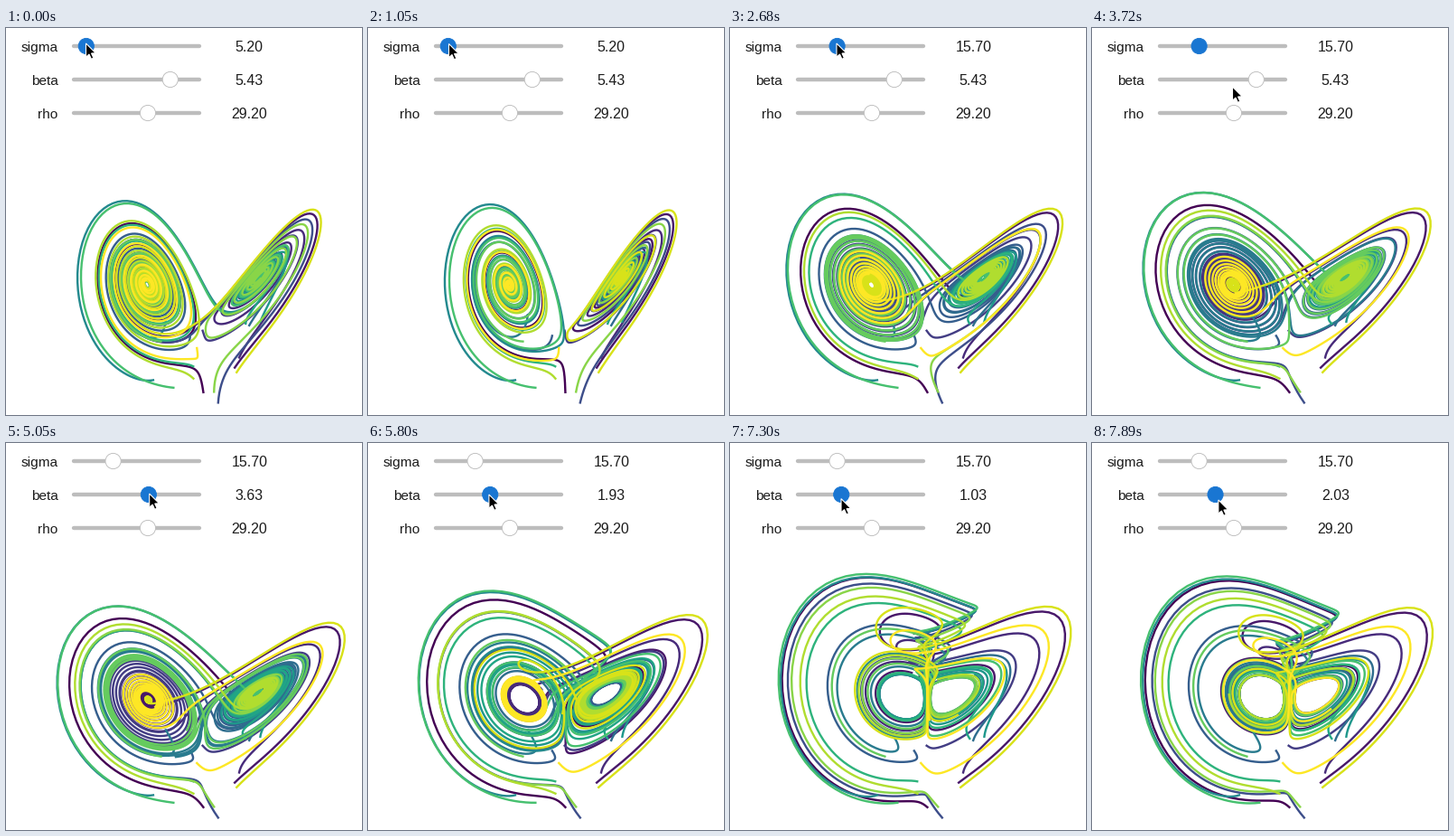
A matplotlib script that plays this animation: 394x428 px, repeating every 8 s.

```python
import numpy as np
import matplotlib.pyplot as plt
from matplotlib.animation import FuncAnimation
from matplotlib.patches import Circle, Polygon

W, H = 394, 428
FRAMES, INTERVAL = 160, 50
TICK = 148.8                      # the picture refreshes once per tick
TICKS = 54
PX = 0.72                         # points per pixel at 100 dpi
BLUE, GREY, INK = "#1976d2", "#bdbdbd", "#1c1c1c"

N, MAX_TIME, STEPS = 18, 4.0, 1000
RHO = 29.2

# (time, value) keys: slider readouts, and the plot that lags behind them
SIGMA = [(1050, 5.2), (2090, 11.7), (2680, 15.7)]
BETA = [(4500, 5.43), (5050, 3.63), (5800, 1.9), (6250, 0.93),
        (6850, 0.83), (7400, 1.1), (7890, 2.03)]
PLOT_SIGMA = [(0, 6.7), (446, 5.2), (1340, 5.2), (2085, 8.7),
              (2830, 13.7), (3050, 13.7), (3110, 15.7)]
PLOT_BETA = [(4900, 5.43), (5059, 5.2), (5500, 3.63), (6250, 1.9),
             (6700, 0.93), (7300, 0.83), (7890, 1.1)]
CURSOR = [(0, 88.5, 17), (1050, 89.5, 17.5), (2090, 107, 17), (2680, 118, 17),
          (3570, 118, 17), (3720, 155.5, 65), (4000, 172, 68), (4310, 185, 60),
          (4500, 183, 56), (5050, 159, 56), (5800, 134, 57), (6250, 120, 58),
          (6850, 119, 60), (7400, 124, 62), (7890, 140, 63)]


def keyed(t, keys, column=1):
    keys = np.array(keys)
    return np.interp(t, keys[:, 0], keys[:, column])


def lorenz(p, sigma, beta):
    x, y, z = p
    return np.array([sigma * (y - x), x * (RHO - z) - y, x * y - beta * z])


def solve(sigma, beta):
    """Trajectories for every tick at once: (STEPS, 3, TICKS, N)."""
    start = -15 + 30 * np.random.RandomState(1).random_sample((N, 3))
    p = np.repeat(start.T[:, None, :], len(sigma), axis=1)
    sigma, beta = sigma[:, None], beta[:, None]
    dt = MAX_TIME / (STEPS - 1)
    path = [p]
    for _ in range(STEPS - 1):
        k1 = lorenz(p, sigma, beta)
        k2 = lorenz(p + dt / 2 * k1, sigma, beta)
        k3 = lorenz(p + dt / 2 * k2, sigma, beta)
        k4 = lorenz(p + dt * k3, sigma, beta)
        p = p + dt / 6 * (k1 + 2 * k2 + 2 * k3 + k4)
        path.append(p)
    return np.array(path)


def project(path, elev=np.radians(30), azim=np.radians(118), scale=180):
    """Perspective view of the 50 x 70 x 50 box, in stage pixels."""
    x = path[:, 0] / 50 * 1.143
    y = path[:, 1] / 70 * 1.143
    z = (path[:, 2] - 30) / 50 * 0.857
    ce, se, ca, sa = np.cos(elev), np.sin(elev), np.cos(azim), np.sin(azim)
    depth = 10 - (ce * ca * x + ce * sa * y + se * z)
    right = -sa * x + ca * y
    up = -se * ca * x - se * sa * y + ce * z
    return 218.5 + 10 * scale * right / depth, 275.2 - 10 * scale * up / depth


ticks = np.arange(TICKS) * TICK
screen_x, screen_y = project(solve(keyed(ticks, PLOT_SIGMA),
                                   keyed(ticks, PLOT_BETA)))

fig = plt.figure(figsize=(W / 100, H / 100), dpi=100, facecolor="white")
ax = fig.add_axes([0, 0, 1, 1])
ax.set(xlim=(0, W), ylim=(H, 0))
ax.axis("off")

curves = [ax.plot([], [], color=c, lw=2.4 * PX)[0]
          for c in plt.cm.viridis(np.linspace(0, 1, N))]


class Slider:
    def __init__(self, label, y, low, high):
        self.y, self.low, self.high = y, low, high
        ax.plot([75.5, 214.5], [y, y], color=GREY, lw=4.4 * PX,
                solid_capstyle="round")
        self.handle = ax.add_patch(Circle((0, y), 8.6, lw=0.9 * PX, zorder=4))
        font = dict(family="Liberation Sans", color=INK, va="baseline")
        ax.text(57.5, y + 5.5, label, size=15.4 * PX, ha="right", **font)
        self.readout = ax.text(269.3, y + 5.7, "", size=16 * PX, ha="center", **font)

    def show(self, value, active=False):
        value = self.low + round((value - self.low) * 10) / 10
        share = (value - self.low) / (self.high - self.low)
        self.handle.center = (74 + 142 * share, self.y)
        self.handle.set(facecolor=BLUE if active else "white",
                        edgecolor=BLUE if active else GREY)
        self.readout.set_text(f"{value:.2f}")


sigma_slider = Slider("sigma", 20, 0, 50)
beta_slider = Slider("beta", 57, -2.67, 8)
rho_slider = Slider("rho", 94, 0, 50)

ARROW = np.array([(0, 0), (0, 15.2), (3.5, 12), (5.9, 17.3), (8.4, 16.2),
                  (6, 11), (10.8, 10.8)])
cursor = ax.add_patch(Polygon(ARROW, facecolor="black", edgecolor="white",
                              lw=1.1 * PX, zorder=6))


def draw(frame):
    tick = min(int((frame * INTERVAL + 40) / TICK), TICKS - 1)
    t = ticks[tick]
    for i, curve in enumerate(curves):
        curve.set_data(screen_x[:, tick, i], screen_y[:, tick, i])
    on_beta = t > 4500
    sigma_slider.show(keyed(t, SIGMA), not on_beta)
    beta_slider.show(keyed(t, BETA), on_beta)
    rho_slider.show(RHO)
    cursor.set_xy(ARROW + [keyed(t, CURSOR, 1), keyed(t, CURSOR, 2)])
    return [*curves, cursor]


anim = FuncAnimation(fig, draw, frames=FRAMES, interval=INTERVAL,
                     init_func=lambda: [], repeat=True, repeat_delay=0)
plt.show()
```
